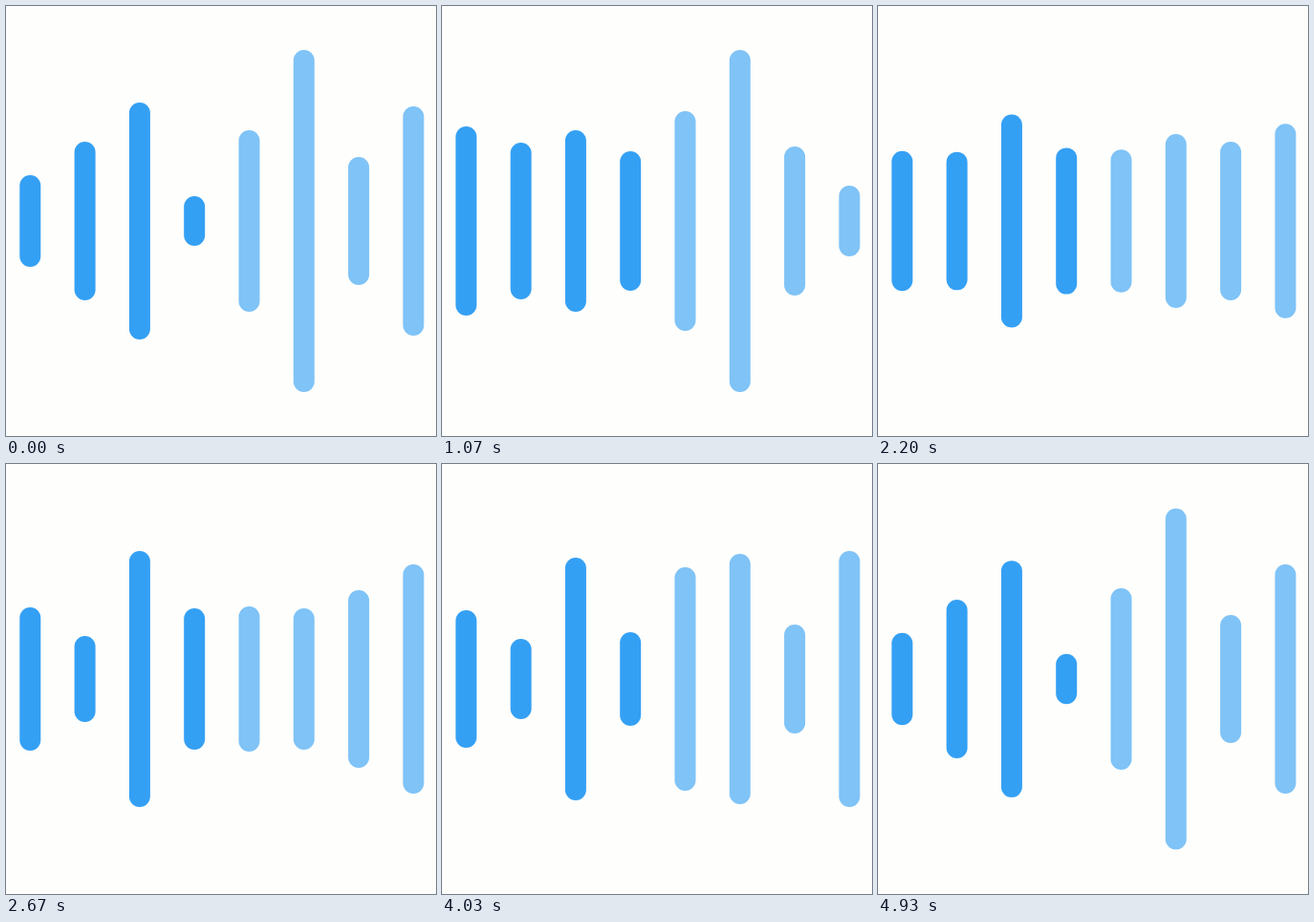
These frames come from a looping animation (450 px wide and 450 px high, 4.96 s). An HTML page with a canvas:

```html
<!DOCTYPE html>
<html lang="en">
<head>
<meta charset="utf-8">
<title>Sound bars</title>
<style>
html, body { margin: 0; width: 100%; height: 100%; overflow: hidden; background: #fefefc; }
canvas { display: block; width: 450px; height: 450px; }
</style>
</head>
<body>
<canvas id="stage" width="450" height="450"></canvas>
<script>
const ctx = document.getElementById('stage').getContext('2d');
const LOOP = 4960, MID = 225, WIDTH = 22, LEFT = 25.3, STEP = 57.3;
const REST = 85, RELAX = 0.4;
const BACK = '#fefefc', DARK = '#34a0f4', LIGHT = '#7fc3f7';

// key poses: half-height of each bar, left to right
const keys = [
  { at: 0, bars: [48, 83, 124, 26, 95, 179, 67, 120] },
  { at: 1070, bars: [99, 82, 95, 73, 115, 179, 78, 37] },
  { at: 1730, bars: [56, 83, 124, 68, 60, 116, 70, 106] },
  { at: 2670, bars: [75, 45, 134, 74, 76, 74, 93, 120] },
  { at: 3470, bars: [70, 27, 41, 73, 133, 162, 79, 91] },
  { at: 4030, bars: [72, 42, 127, 49, 117, 131, 57, 134] }
];
keys.push({ at: LOOP, bars: keys[0].bars });

// ease between poses, relaxing toward the rest height on the way
function blend(a, b, u) {
  const ease = (1 - Math.cos(Math.PI * u)) / 2;
  const h = a + (b - a) * ease;
  return h + (REST - h) * RELAX * Math.sin(Math.PI * u) ** 2;
}

function drawBar(i, half) {
  const x = LEFT + i * STEP, reach = half - WIDTH / 2;
  ctx.strokeStyle = i < 4 ? DARK : LIGHT;
  ctx.beginPath();
  ctx.moveTo(x, MID - reach);
  ctx.lineTo(x, MID + reach);
  ctx.stroke();
}

function draw(t) {
  const next = keys.findIndex(k => k.at > t);
  const from = keys[next - 1], to = keys[next];
  const u = (t - from.at) / (to.at - from.at);
  ctx.fillStyle = BACK;
  ctx.fillRect(0, 0, 450, 450);
  ctx.lineWidth = WIDTH;
  ctx.lineCap = 'round';
  from.bars.forEach((half, i) => drawBar(i, blend(half, to.bars[i], u)));
}

const start = performance.now();
function tick() {
  draw((performance.now() - start) % LOOP);
  requestAnimationFrame(tick);
}
tick();
</script>
</body>
</html>
```
